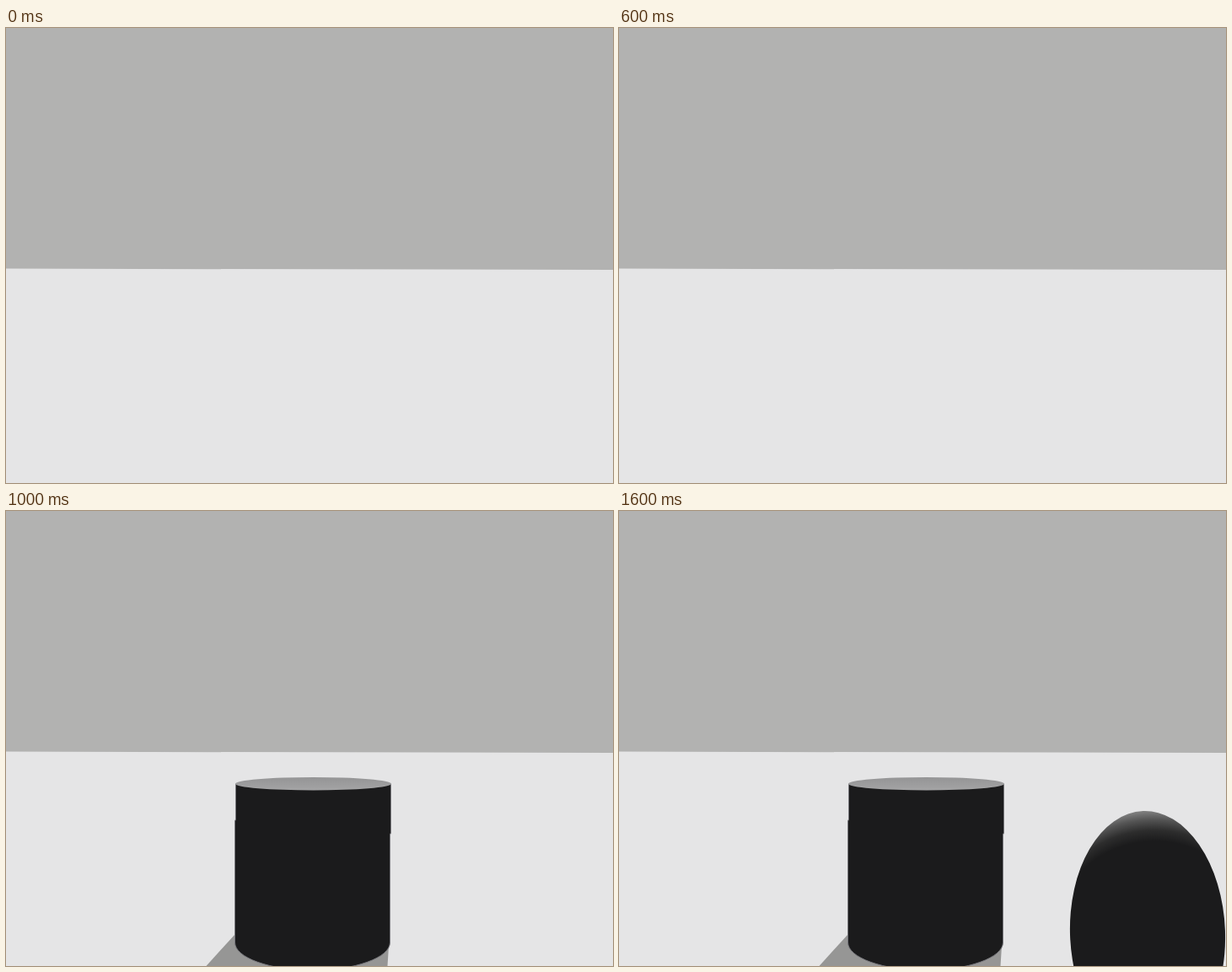
Write an HTML page that moves like this. It is 720 by 540 pixels and loops after 1800 ms.

```html
<!DOCTYPE html>
<html lang="en">
<head>
<meta charset="utf-8">
<title>Solids</title>
<style>
  html, body { margin: 0; width: 100%; height: 100%; overflow: hidden; background: #e5e5e6; }
  svg { display: block; width: 720px; height: 540px; }
  .solid { animation: 1800ms step-end infinite; }
  #cylinder { animation-name: cylinder; }
  #egg { animation-name: egg; }
  @keyframes cylinder {
    0% { visibility: hidden; }
    55.5556%, 100% { visibility: visible; }
  }
  @keyframes egg {
    0% { visibility: hidden; }
    77.7778%, 100% { visibility: visible; }
  }
</style>
</head>
<body>
<svg viewBox="0 0 720 540">
  <defs>
    <radialGradient id="shade" gradientUnits="userSpaceOnUse" cx="635" cy="516" r="161">
      <stop offset=".77" stop-color="#1b1b1c"/>
      <stop offset=".85" stop-color="#2d2d2d"/>
      <stop offset=".93" stop-color="#555"/>
      <stop offset="1" stop-color="#858585"/>
    </radialGradient>
    <linearGradient id="lid" x1="0" y1="0" x2="0" y2="1">
      <stop offset="0" stop-color="#949495"/>
      <stop offset="1" stop-color="#a4a4a5"/>
    </linearGradient>
  </defs>

  <rect width="720" height="540" fill="#e5e5e6"/>
  <path d="M0 0H720V287L520 286.5L168 286L0 285.5Z" fill="#b2b2b1"/>

  <g id="cylinder" class="solid">
    <path d="M272 502L237.500 540H452.500L454 516Z" fill="#969695"/>
    <path d="M272.500 324V366L271.500 368V512A92 33 0 0 0 455.500 512V384L456.500 382V324Z"
      fill="#1b1b1c" stroke="#77777c"/>
    <ellipse cx="364.500" cy="323.700" rx="92.500" ry="7.700" fill="url(#lid)"/>
  </g>

  <ellipse id="egg" class="solid" cx="627" cy="501" rx="92" ry="145"
    transform="rotate(-2.1 627 501)" fill="url(#shade)"/>
</svg>
</body>
</html>
```
